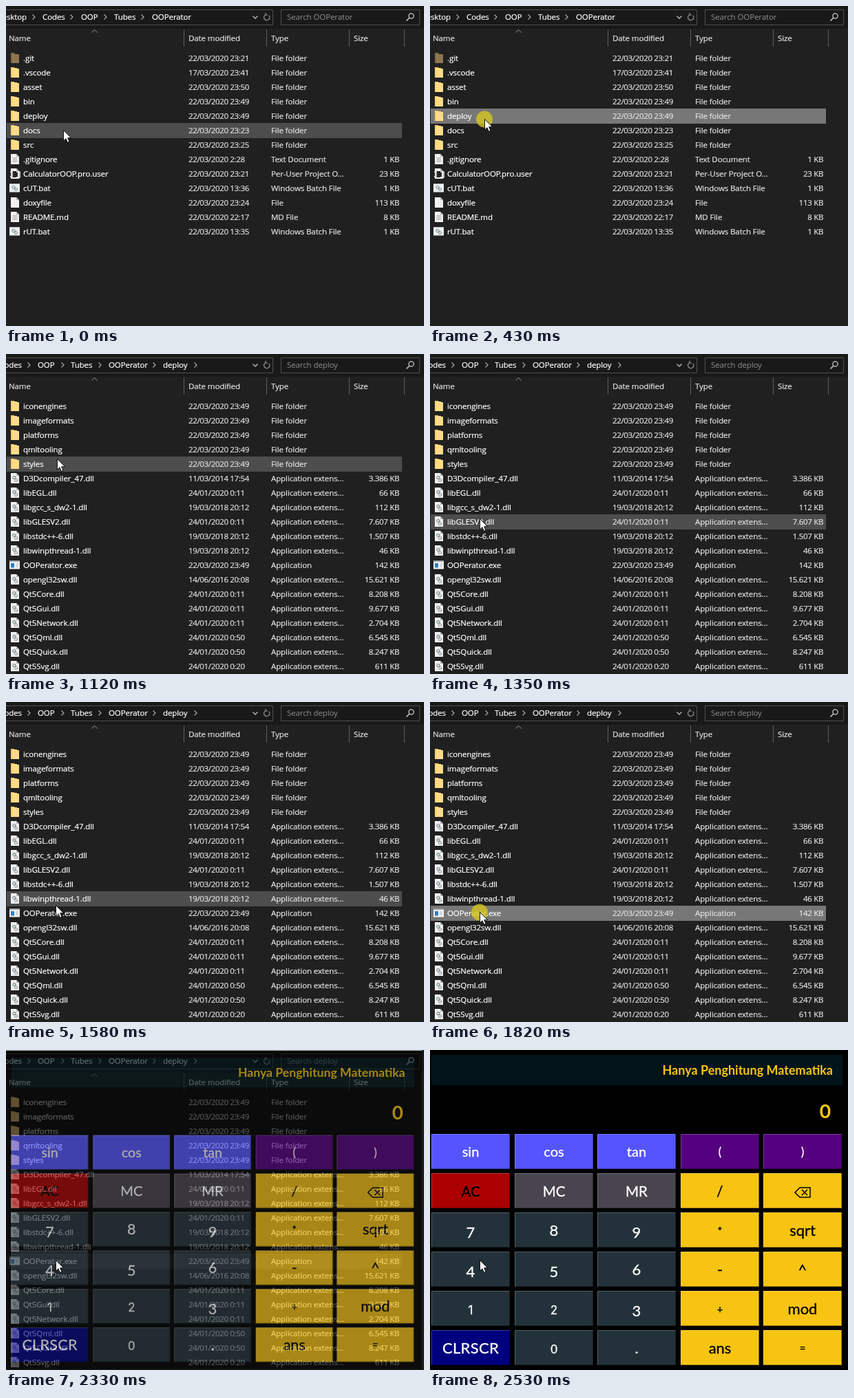
These frames come from a looping animation (607x465 px, 3.55 s). An HTML page:

```html
<!DOCTYPE html>
<html lang="en">
<head>
<meta charset="utf-8">
<title>Folder browsing</title>
<style>
  html, body { margin: 0; width: 100%; height: 100%; overflow: hidden; background: #000; }
  svg { display: block; width: 607px; height: 465px; }
  text { white-space: pre; }
  .ui { font: 11.5px "Open Sans", "Noto Sans", sans-serif; letter-spacing: -.1px; }
  .ui text { fill: #fff; stroke: #fff; stroke-width: .22; }
  .ui .soft, .ui .num { fill: #e4e4e4; stroke: #e4e4e4; }
  .ui .num { letter-spacing: -.34px; }
  .ui .hint { fill: #8f8f8f; stroke: none; }
  .calc { font-family: Lato, "Open Sans", sans-serif; text-anchor: middle; }
  .calc .key { stroke-width: .35; }
  .calc .low { font-family: Inter, sans-serif; }
</style>
</head>
<body>
<svg id="stage" viewBox="0 0 607 465" xmlns="http://www.w3.org/2000/svg">
  <defs>
    <g id="folder">
      <path d="M0 0H5L6 2H12V15H0Z" fill="#e9bd58"/>
      <path d="M1 1H9V2H12V15H1Z" fill="#fbdc86"/>
      <path d="M0 0H2V15H0Z" fill="#f6cf70"/>
    </g>
    <g id="hidden">
      <path d="M0 0H5L6 2H12V15H0Z" fill="#7f6847"/>
      <path d="M2 2H12V15H2Z" fill="#8e7651"/>
    </g>
    <g id="page">
      <path d="M0 0H8L12 4V15H0Z" fill="#f0f2f2"/>
      <path d="M8 0V4H12Z" fill="#b5b5b5"/>
    </g>
    <g id="lines">
      <use href="#page"/>
      <path d="M2.5 5.5H9.5M2.5 7.5H9.5M2.5 9.5H9.5M2.5 11.5H9.5" stroke="#9a9a9a" stroke-width=".8"/>
    </g>
    <g id="blank"><use href="#page"/></g>
    <g id="gears">
      <use href="#page"/>
      <circle cx="5" cy="6.5" r="2" fill="none" stroke="#6d7b80" stroke-width="1.6" stroke-dasharray="1.2 .5"/>
      <circle cx="7.5" cy="10.5" r="2" fill="none" stroke="#8b979b" stroke-width="1.6" stroke-dasharray="1.2 .5"/>
    </g>
    <g id="project">
      <use href="#page"/>
      <rect x="1" y="4" width="9" height="9" fill="#262626"/>
      <path d="M-1 5H2V12H-1M8 5H13V13H8" fill="none" stroke="#eee" stroke-width="1.5"/>
    </g>
    <g id="batch">
      <rect x="-2" y="1" width="15" height="12.5" fill="#eef1f2"/>
      <path d="M-2 1.5H13" stroke="#a9b3b8"/>
      <circle cx="4" cy="6.5" r="2" fill="none" stroke="#73868c" stroke-width="1.3" stroke-dasharray="1.2 .5"/>
      <circle cx="7.5" cy="9.5" r="2" fill="none" stroke="#73868c" stroke-width="1.3" stroke-dasharray="1.2 .5"/>
    </g>
    <g id="app">
      <rect x="-2" y="1" width="15" height="12.5" fill="#f3f3f3"/>
      <path d="M-2 2H13" stroke="#9aa5ab" stroke-width="2"/>
      <rect x="0" y="5" width="5" height="6.5" fill="#2f7fc4"/>
      <path d="M7 6H11M7 8H11M7 10H11" stroke="#aaa" stroke-width=".8"/>
    </g>
  </defs>
  <g class="ui">
    <rect width="607" height="465" fill="#202020"/>
    <rect width="607" height="33" fill="#191919"/>
    <path d="M-2 5.5H387.5V27.5H-2M399.5 5.5H600.5V27.5H399.5Z" fill="none" stroke="#4f4f4f"/>
    <path d="M358.5 14.5L362 18L365.5 14.5" fill="none" stroke="#bbb" stroke-width="1.4"/>
    <path d="M382.2 14A4.2 4.2 0 1 1 377 12.6M377 9.8V13H380.2" fill="none" stroke="#999" stroke-width="1.2"/>
    <circle cx="588.5" cy="14.5" r="3.6" fill="none" stroke="#c8c8c8" stroke-width="1.3"/>
    <path d="M586 17L581.5 21.5" stroke="#c8c8c8" stroke-width="1.6"/>
    <path d="M258.5 34V59M378.5 34V59M498.5 34V59M578.5 34V59" stroke="#5f5f5f"/>
    <path d="M124.5 38.5L128.5 34.5L132.5 38.5" fill="none" stroke="#9a9a9a"/>
    <g id="heads"></g>
    <rect id="hot" x="1" width="574" height="22"/>
    <g id="home"></g>
    <g id="sub"></g>
    <path id="tail" d="M273.5 12.5L277 16L273.5 19.5" fill="none" stroke="#aaa" stroke-width="1.2"/>
  </g>
  <g id="calc" class="calc"></g>
  <circle id="press" r="12" fill="#d8c81e" fill-opacity=".78"/>
  <path id="mouse" d="M.5 .5V16L4 12.7L6.4 18.3L9 17.2L6.6 11.7H11.5Z" fill="#fff" stroke="#000" stroke-width=".9"/>
</svg>
<script>
const NS = "http://www.w3.org/2000/svg", LOOP = 3550;
const $ = id => document.getElementById(id);

function add(parent, tag, attrs, text) {
  const el = document.createElementNS(NS, tag);
  for (const k in attrs) el.setAttribute(k, attrs[k]);
  if (text !== undefined) el.textContent = text;
  parent.appendChild(el);
  return el;
}
const label = (g, x, y, s, cls = "", anchor = "start") =>
  add(g, "text", { x, y, class: cls, "text-anchor": anchor }, s);

["Name", "Date modified", "Type", "Size"].forEach((s, i) =>
  label($("heads"), [4, 265, 385, 505][i], 51, s, "soft"));

const TYPES = {
  hidden: "File folder", folder: "File folder", lines: "Text Document",
  project: "Per-User Project O...", batch: "Windows Batch File", blank: "File",
  gears: "Application extens...", app: "Application"
};

// Each line: icon|name|date|size|type override
function listing(g, src) {
  src.trim().split("\n").forEach((line, i) => {
    const [icon, name, date, size, type] = line.trim().split("|");
    const y = 80 + 21 * i;
    add(g, "use", { href: "#" + icon, x: 7, y: y - 12 });
    label(g, 25, y, name);
    label(g, 265, y, date, "num");
    label(g, 385, y, type || TYPES[icon], "soft");
    if (size) label(g, 571, y, size + " KB", "num", "end");
  });
}

function crumbs(g, parts, arrows, search) {
  parts.forEach(([s, x, anchor]) => label(g, x, 20, s, "", anchor));
  arrows.forEach(x => add(g, "path", {
    d: `M${x - 1.5} 12.5l3.5 3.5l-3.5 3.5`, fill: "none", stroke: "#aaa", "stroke-width": 1.2
  }));
  label(g, 408, 20, "Search " + search, "hint");
}

listing($("home"), `
  hidden|.git|22/03/2020 23:21
  folder|.vscode|17/03/2020 23:41
  folder|asset|22/03/2020 23:50
  folder|bin|22/03/2020 23:49
  folder|deploy|22/03/2020 23:49
  folder|docs|22/03/2020 23:23
  folder|src|22/03/2020 23:25
  lines|.gitignore|22/03/2020 2:28|1
  project|CalculatorOOP.pro.user|22/03/2020 23:21|23
  batch|cUT.bat|22/03/2020 13:36|1
  blank|doxyfile|22/03/2020 23:24|113
  lines|README.md|22/03/2020 22:17|8|MD File
  batch|rUT.bat|22/03/2020 13:35|1`);
crumbs($("home"),
  [["Desktop", 30, "end"], ["Codes", 53], ["OOP", 109], ["Tubes", 157], ["OOPerator", 212]],
  [40, 95, 144, 198], "OOPerator");

listing($("sub"), `
  folder|iconengines|22/03/2020 23:49
  folder|imageformats|22/03/2020 23:49
  folder|platforms|22/03/2020 23:49
  folder|qmltooling|22/03/2020 23:49
  folder|styles|22/03/2020 23:49
  gears|D3Dcompiler_47.dll|11/03/2014 17:54|3.386
  gears|libEGL.dll|24/01/2020 0:11|66
  gears|libgcc_s_dw2-1.dll|19/03/2018 20:12|112
  gears|libGLESV2.dll|24/01/2020 0:11|7.607
  gears|libstdc++-6.dll|19/03/2018 20:12|1.507
  gears|libwinpthread-1.dll|19/03/2018 20:12|46
  app|OOPerator.exe|22/03/2020 23:49|142
  gears|opengl32sw.dll|14/06/2016 20:08|15.621
  gears|Qt5Core.dll|24/01/2020 0:11|8.208
  gears|Qt5Gui.dll|24/01/2020 0:11|9.677
  gears|Qt5Network.dll|24/01/2020 0:11|2.704
  gears|Qt5Qml.dll|24/01/2020 0:50|6.545
  gears|Qt5Quick.dll|24/01/2020 0:50|8.247
  gears|Qt5Svg.dll|24/01/2020 0:20|611`);
crumbs($("sub"),
  [["Codes", 23, "end"], ["OOP", 46], ["Tubes", 94], ["OOPerator", 149], ["deploy", 228]],
  [33, 82, 136, 215], "deploy");

function buildCalc(g) {
  // window caption lies just above the stage
  add(g, "rect", { x: -9, y: -33, width: 619, height: 31, fill: "#fff" });
  add(g, "rect", { x: -9, y: -3, width: 619, height: 472, fill: "#000" });
  add(g, "rect", { x: 2, y: 7, width: 597, height: 44, fill: "#021419" });
  add(g, "text", { x: 585, y: 36, fill: "#f7c412", "font-size": 18, "font-weight": 700, style: "text-anchor:end" },
    "Hanya Penghitung Matematika");
  add(g, "text", { x: 574, y: 98.5, fill: "#f7c412", "font-size": 27, "font-weight": 600, class: "low" }, "0");

  const keys = ["sin cos tan ( )", "AC MC MR / ⌫", "7 8 9 * sqrt", "4 5 6 - ^", "1 2 3 + mod", "CLRSCR 0 . ans ="];
  const colour = (r, c) =>
    r === 0 ? (c < 3 ? "#5555ff" : "#55007f") :
    c > 2 ? "#f7c412" :
    r === 1 ? (c ? "#49454f" : "#aa0000") :
    r === 5 && !c ? "#00007f" : "#23323a";

  keys.forEach((row, r) => row.split(" ").forEach((s, c) => {
    const x = Math.round(2 + 120.5 * c), y = 122 + 57 * r, mid = x + 57;
    const ink = r > 0 && (c > 2 || s === "AC") ? "#000" : "#fff";
    add(g, "rect", { x, y, width: 114, height: 51, fill: colour(r, c) });
    add(g, "path", { d: `M${x + .5} ${y + 51}V${y + .5}H${x + 114}`, fill: "none", stroke: "#fff", "stroke-opacity": .22 });
    add(g, "path", { d: `M${x + 113.5} ${y}V${y + 50.5}H${x}`, fill: "none", stroke: "#000", "stroke-opacity": .35 });
    if (s === "⌫") {
      add(g, "path", { d: `M${mid - 11} ${y + 28}l7 -7h15v14h-15zM${mid - 1} ${y + 24}l8 8m0 -8l-8 8`,
        fill: "none", stroke: "#000", "stroke-width": 1.5 });
      return;
    }
    const low = /^[012]$/.test(s), small = /^[*+=]$/.test(s);
    const size = low ? 17 : small ? 15 : r === 0 ? (c < 3 ? 20 : 17) : r === 1 ? 20.5 : 22;
    let by = y + (r === 0 ? 33 : 33.5);
    if (/^[34579]$/.test(s)) by += 3.5;
    if (small) by -= 2;
    if (s === "(" || s === ")") by -= 1.5;
    add(g, "text", {
      x: mid, y: by, "font-size": size, fill: ink, stroke: ink, class: low ? "key low" : "key",
      "letter-spacing": s === "CLRSCR" ? .3 : 0
    }, s);
  }));
}
buildCalc($("calc"));

// Pointer stops: time, x, y
const stops = [
  [0, 83, 180], [40, 82, 176], [90, 80, 168], [140, 79, 164],
  [790, 78, 162], [840, 76, 158], [880, 75, 154], [930, 74, 153],
  [1120, 74, 152], [1150, 74, 158], [1200, 74, 174], [1250, 73, 194], [1300, 73, 217],
  [1350, 72, 239], [1390, 72, 255], [1440, 72, 272], [1490, 72, 286], [1540, 72, 295],
  [1590, 72, 301], [1640, 72, 304], [1690, 72, 305]
];
const clicks = [[280, 350], [430, 510], [1690, 1770], [1820, 1920]];
const opening = [2240, 2290, 2330, 2380, 2430, 2480, 2530];
const within = (t, a, b) => t >= a && t < b;
const show = (id, on) => $(id).setAttribute("visibility", on ? "visible" : "hidden");

function draw(t) {
  const [, x, y] = stops.filter(s => s[0] <= t).pop();
  $("mouse").setAttribute("transform", `translate(${x} ${y})`);
  $("press").setAttribute("cx", x);
  $("press").setAttribute("cy", y + .5);
  show("press", clicks.some(([a, b]) => within(t, a, b)));

  const row = Math.floor((y - 65) / 21);
  const picked = within(t, 280, 560) || within(t, 1690, 2190);
  $("hot").setAttribute("y", 65 + 21 * row);
  $("hot").setAttribute("fill", picked ? "#777" : t >= 2190 ? "#333" : "#4d4d4d");

  show("home", t < 560);
  show("sub", t >= 560);
  show("tail", t >= 790);

  const step = opening.filter(s => s <= t).pop();
  show("calc", step !== undefined);
  if (step !== undefined) {
    const rest = 1 - (step - 2200) / 330;
    const k = 1 - .086 * rest ** 3;
    $("calc").setAttribute("opacity", 1 - rest * rest);
    $("calc").setAttribute("transform", `translate(${300 * (1 - k)} ${212 * (1 - k)}) scale(${k})`);
  }
}

const start = performance.now();
function tick() {
  draw((performance.now() - start) % LOOP);
  requestAnimationFrame(tick);
}
tick();
</script>
</body>
</html>
```
